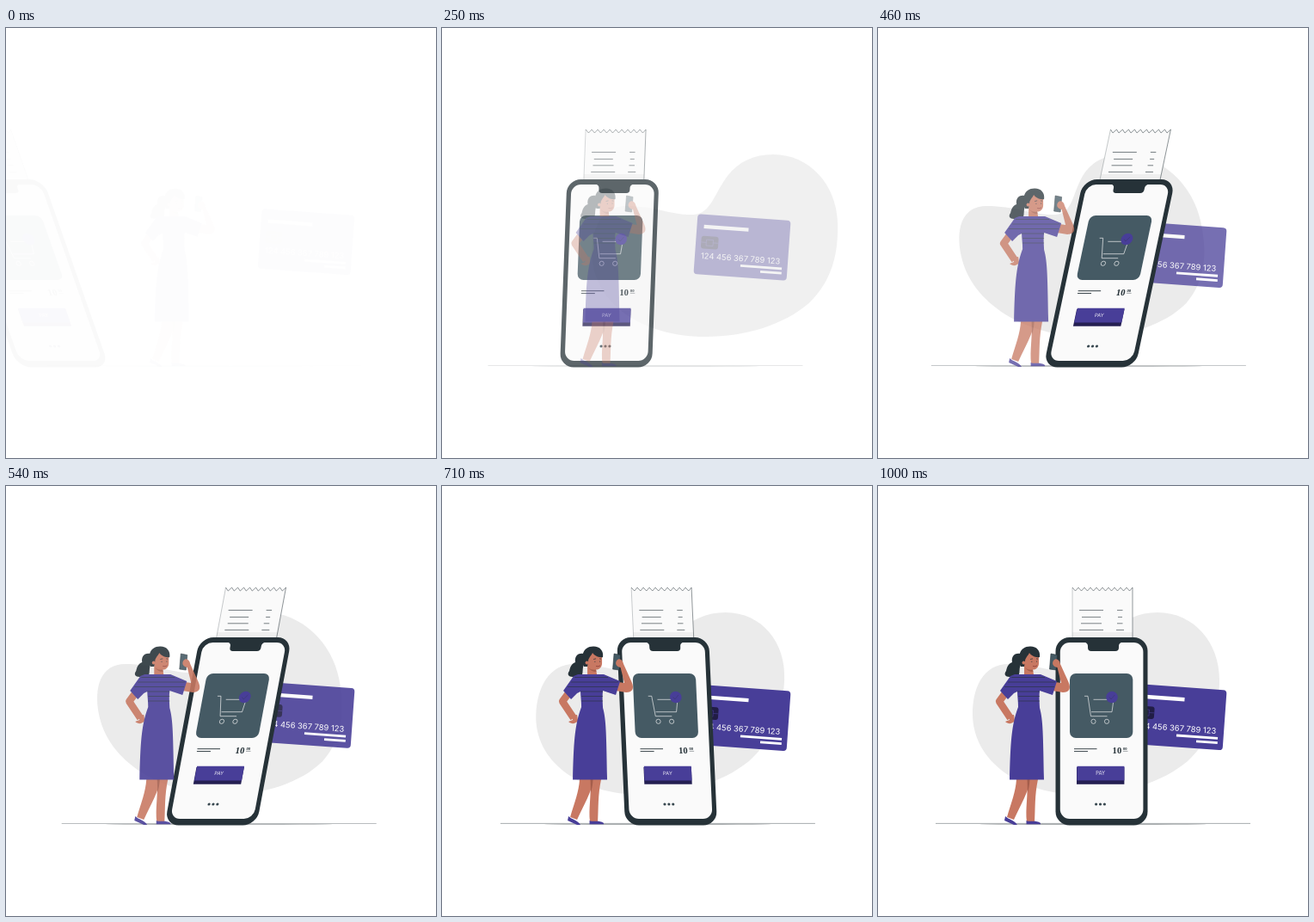
An HTML page for the animation above (1040 ms loop, 500 by 500 pixels).

```html
<!DOCTYPE html>
<html lang="en">
<head>
<meta charset="utf-8">
<title>Mobile payment</title>
<style>
  html, body { margin: 0; width: 100%; height: 100%; overflow: hidden; background: #fff; }
  svg { display: block; width: 100%; height: 100%; }
  .purple { fill: #483e98; }
  .dark { fill: #263238; }
  .skin { fill: #c87862; }
  .ink { fill: none; stroke: #263238; }
  .sans { font-family: Inter, "Open Sans", sans-serif; }
  .serif { font-family: "Liberation Serif", serif; font-weight: bold; }
</style>
</head>
<body>
<svg viewBox="0 0 500 500">
  <path id="blob" fill="#ebebeb" d="M110 265C110 235 122 207 152 207C185 207 205 218 230 217C250 216 255 192 271 172C285 155 303 147 325 147C368 147 397 183 397 225C397 262 388 294 360 320C330 345 285 359 238 359C165 359 110 320 110 265Z"/>

  <g id="floor">
    <path class="ink" stroke-width=".5" stroke-opacity=".8" d="M67 392.4H433"/>
    <ellipse cx="250" cy="393.3" rx="132" ry=".7" fill="#a9adaf"/>
  </g>

  <g id="card">
    <g transform="translate(349 268.6) rotate(4.1)">
      <rect class="purple" x="-54.2" y="-35" width="108.4" height="70" rx="4"/>
      <rect x="-46" y="-23" width="52" height="4.3" fill="#fff"/>
      <rect x="-48" y="-10" width="20" height="14.6" rx="3" fill="#211d45"/>
      <path fill="none" stroke="#483e98" stroke-width=".6" d="M-48-2.7H-42M-34-2.7H-28M-42-6V1H-34V-6Z"/>
      <text class="sans" x="-47.2" y="16.3" font-size="9.4" fill="#fff">124 456 367 789 123</text>
      <rect x="-.5" y="20" width="48.2" height="2.9" fill="#fff"/>
      <rect x="23" y="25.3" width="24.8" height="2.8" fill="#fff"/>
    </g>
  </g>

  <g id="phone">
    <path id="receipt" fill="#fafafa"/>
    <rect x="226" y="170" width="70" height="7" fill="#ececec" opacity=".7"/>
    <path id="receiptEdge" class="ink" stroke-width=".5"/>
    <path class="ink" stroke-width=".25" d="M226 118V176"/>
    <path class="ink" stroke-width=".6" d="M234 144.4H262M278 144.4H284.5M237 152.4H259M279 152.4H284M236 159.8H260M278 159.8H284.5M234 167.4H262M277 167.4H286"/>

    <rect class="dark" x="206.5" y="176" width="107" height="218.5" rx="16"/>
    <rect x="211.8" y="182" width="96.6" height="205" rx="11" fill="#fafafa"/>
    <path class="dark" d="M240 181.5H284Q280 182.5 280 186V188Q280 192 276 192H248Q244 192 244 188V186Q244 182.5 240 181.5Z"/>

    <rect x="223" y="218" width="73.3" height="75" rx="7" fill="#455a64"/>
    <g fill="none" stroke="#f5f5f5" stroke-width=".65">
      <path d="M240 244.3H244L247.5 267.7H266.5M250.5 248.3H274L272 262.7H248"/>
      <circle cx="250.5" cy="273.8" r="2.6"/>
      <circle cx="266" cy="273.8" r="2.6"/>
    </g>
    <circle class="purple" cx="272" cy="245.5" r="6.8"/>
    <path class="ink" stroke-width=".5" opacity=".5" d="M268.8 245.5L271 248L275.2 243"/>

    <path class="ink" stroke-width=".9" d="M228 305.7H254.5M228 308.6H244"/>
    <text class="serif dark" x="272.6" y="311" font-size="10.6">10</text>
    <text class="serif dark" x="285" y="307.4" font-size="4.6">00</text>
    <path class="ink" stroke-width=".4" d="M285 308.4H290.5"/>

    <rect x="231" y="327" width="55.4" height="19.8" fill="#241f52"/>
    <rect class="purple" x="231.4" y="325.8" width="55" height="16.6"/>
    <text class="sans" x="258.6" y="336" font-size="5.8" fill="#eceaf6" text-anchor="middle">PAY</text>
    <g fill="#37474f">
      <circle cx="253.6" cy="370" r="1.6"/>
      <circle cx="258.5" cy="370" r="1.6"/>
      <circle cx="263.4" cy="370" r="1.6"/>
    </g>
  </g>

  <g id="woman">
    <path class="dark" d="M165 195C158 194 155 199 156 205C151 207 150 211 149 215C146 219 148 222 153 222L163 221C166 217 163 211 167 206Z"/>
    <path class="skin" d="M161 341H177C175 356 166 370 158 388L150 385C155 368 160 356 161 341Z"/>
    <path class="skin" d="M173 341H186C182 360 183 374 182 391H173C171 374 175 360 173 341Z"/>
    <path d="M173.5 341H176.5C176 350 174.5 354 174 357Z" fill="#a45d4b"/>
    <path class="purple" d="M148 384C152 388 158 388 162 394H158L147 389Z"/>
    <path class="purple" d="M172.5 389C177 391 184 388 189 392V393.3H172.5Z"/>
    <path d="M148 241L141 250.5L154 270" fill="none" stroke="#c87862" stroke-width="8.5" stroke-linejoin="round"/>
    <path class="skin" d="M152 267L158 266L159 273C156 277 151 277 148 274L153 272Z"/>
    <path d="M201 195L208.5 196.5L207 214L199.5 213Z" fill="#455a64" stroke="#263238" stroke-width=".6"/>
    <path class="skin" d="M206 228L213 229L208.5 211C203 210 202 206 204 203C207 199.5 211 202 212 207L221.5 228C225 236 222 240 215 240L203 238Z"/>
    <path class="purple" d="M159 219H189L208 227L203 243L188 238C187 247 188 254 188 258C192 272 192 290 193 341.5H153C154 300 155 278 163 257C163 250 162 244 162 239L158 241L151 248L142 238L154 221Z"/>
    <path class="ink" stroke-width=".6" d="M155 222.5H194M151 228H206M147 233.5H205M162 239H188M163 244.5H188M163 250H188"/>
    <path class="skin" d="M170 194H187V206C187 211 183 214 180 213.5L181 219H170Z"/>
    <path d="M171 211C174 214 177 214 180 213.5L180.4 216C176 216 173 214 171 211Z" fill="#a45d4b"/>
    <path class="dark" d="M166 210C162 199 164 186.5 177 186.5C185 186.5 189 192 188 199C183 200 178 197 176 194C174 198 171 200 171 204L170 210Z"/>
    <circle class="skin" cx="169.5" cy="205.5" r="2"/>
    <path class="ink" stroke-width=".7" d="M177 201.5L180 200.8M184 200.8L186 201.2M178.8 203.8V205M184.5 203.5V204.7"/>
    <path d="M180 209.5Q183 210.5 185 208.8" fill="none" stroke="#8e3b35" stroke-width=".8"/>
  </g>
</svg>
<script>
const LOOP = 1040, FRAME = 1000 / 24, TICK = 1000 / 60, SLIDE = 20;
const el = id => document.getElementById(id);
const mix = (a, b, p) => a + (b - a) * p;
const clamp = v => Math.max(0, Math.min(1, v));
const snap = (v, unit) => Math.round(v / unit) * unit;
const shear = degrees => Math.tan(degrees * Math.PI / 180);

// Overshooting curve: cubic-bezier(.36, -.01, .5, 1.38)
const bezier = (a, b, s) => 3 * (1 - s) ** 2 * s * a + 3 * (1 - s) * s * s * b + s ** 3;
function ease(x) {
  if (x <= 0) return 0;
  if (x >= 1) return 1;
  let low = 0, high = 1;
  for (let i = 0; i < 24; i++) {
    const mid = (low + high) / 2;
    if (bezier(.36, .5, mid) < x) low = mid; else high = mid;
  }
  return bezier(-.01, 1.38, low);
}

// Sweep in from one side, lean past upright, lean back, settle.
function sweep(node, ms, side) {
  let shift = 0, lean, alpha = 1;
  if (ms < 600) {
    const p = ease(ms / 600);
    shift = mix(-250, 0, p);
    lean = mix(shear(20), shear(-10), p);
    alpha = clamp(p);
  } else if (ms < 800) lean = mix(shear(-10), shear(2), ease((ms - 600) / 200));
  else lean = mix(shear(2), 0, ease((ms - 800) / 200));
  const k = side * lean;
  node.setAttribute("transform", `matrix(1 0 ${k} 1 ${side * shift - 250 * k} 0)`);
  node.setAttribute("opacity", alpha);
}

function slide(node, ms, dx, dy) {
  const p = ease(ms / 1000), rest = SLIDE * (1 - p);
  node.setAttribute("transform", `translate(${dx * rest} ${dy * rest})`);
  node.setAttribute("opacity", clamp(p));
}

const teeth = "M226 118" + "l3.5 4l3.5 -4".repeat(10) + "V176";
el("receiptEdge").setAttribute("d", teeth);
el("receipt").setAttribute("d", teeth + "H226Z");

// Pictures change 24 times a second; each shows the nearest 60 Hz moment.
function draw(time) {
  const step = Math.min(24, Math.floor((time % LOOP + 5) / FRAME));
  const ms = snap(snap(step * FRAME, 10) + FRAME + .1, TICK);
  sweep(el("phone"), ms, 1);
  sweep(el("blob"), ms, -1);
  slide(el("woman"), ms, 1, 0);
  slide(el("floor"), ms, -1, 0);
  slide(el("card"), ms, 0, -1);
}

const start = performance.now();
function tick() {
  draw(performance.now() - start);
  requestAnimationFrame(tick);
}
tick();
</script>
</body>
</html>
```
